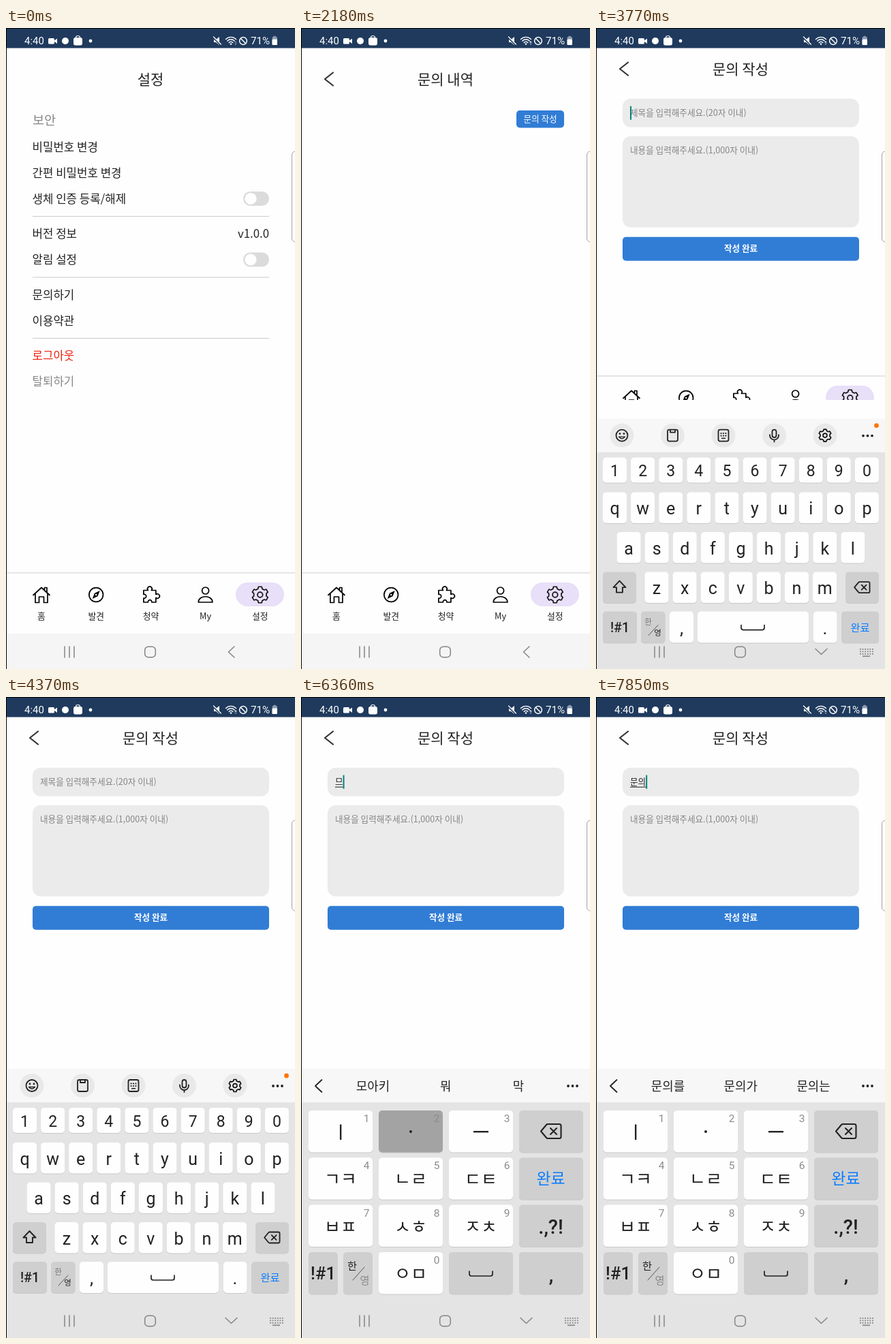
An HTML page with a canvas that plays this animation: 424x941 px, repeating every 8 s.

```html
<!DOCTYPE html>
<html lang="ko">
<head>
<meta charset="utf-8">
<title>문의 작성</title>
<style>
html, body { margin: 0; width: 100%; height: 100%; overflow: hidden; background: #fefefe; }
canvas { display: block; width: 424px; height: 941px; }
</style>
</head>
<body>
<canvas id="stage"></canvas>
<script>
const W = 424, H = 941, LOOP = 8000;
const KR = '"Noto Sans CJK KR", "Noto Sans CJK", sans-serif';
const RB = 'Roboto, sans-serif';
const INK = '#222', PAGE = '#fefefe', BLUE = '#317dd5', HINT = '#858585';

const canvas = document.getElementById('stage');
const c = canvas.getContext('2d');
const dpr = window.devicePixelRatio || 1;
canvas.width = W * dpr;
canvas.height = H * dpr;

const clamp = v => Math.min(1, Math.max(0, v));
const smooth = v => v * v * (3 - 2 * v);

// y is the visual middle of the line
function txt(s, x, y, size, color = INK, align = 'center', weight = 400, font = KR) {
  c.font = `${weight} ${size}px ${font}`;
  c.textAlign = align;
  c.fillStyle = color;
  c.fillText(s, x, y + size * (font === KR ? 0.37 : 0.355));
}
function box(x, y, w, h, color) {
  c.fillStyle = color;
  c.fillRect(x, y, w, h);
}
function round(x, y, w, h, r, color) {
  c.beginPath();
  c.roundRect(x, y, w, h, r);
  c.fillStyle = color;
  c.fill();
}
function dot(x, y, r, color) {
  c.beginPath();
  c.arc(x, y, r, 0, Math.PI * 2);
  c.fillStyle = color;
  c.fill();
}
function ring(x, y, r, color, w) {
  c.beginPath();
  c.arc(x, y, r, 0, Math.PI * 2);
  c.strokeStyle = color;
  c.lineWidth = w;
  c.stroke();
}
function stroke(d, color, w) {
  c.strokeStyle = color;
  c.lineWidth = w;
  c.stroke(new Path2D(d));
}
function fill(d, color) {
  c.fillStyle = color;
  c.fill(new Path2D(d));
}
function at(x, y, draw) {
  c.save();
  c.translate(x, y);
  draw();
  c.restore();
}

function gear(r, w) {
  c.beginPath();
  for (let i = 0; i < 6; i++) {
    const a = i * Math.PI / 3 - Math.PI / 2;
    for (const [da, k] of [[-0.33, 0.78], [-0.2, 1], [0.2, 1], [0.33, 0.78]])
      c.lineTo(Math.cos(a + da) * r * k, Math.sin(a + da) * r * k);
  }
  c.closePath();
  c.strokeStyle = '#111';
  c.lineWidth = w;
  c.stroke();
  ring(0, 0, r * 0.32, '#111', w);
}

// ---- system chrome ----
function statusBar(t) {
  box(0, 0, W, 29.5, '#1f3a5d');
  txt('4:40', 27, 19, 15, '#fff', 'left', 400, RB);
  round(62, 15, 9, 8.5, 1.5, '#fff');
  fill('M70 19l5-3.5v7.5z', '#fff');
  dot(87, 19, 5, '#fff');
  round(99, 14, 13, 11.5, 3, '#fff');
  stroke('M102.5 15v-1a3 2.5 0 0 1 6 0v1', '#fff', 1.2);
  dot(124, 19, 2.4, '#fff');
  fill('M305 17h3l5-4v12l-5-4h-3z', '#fff');
  stroke('M304 13.5l11 11', '#1f3a5d', 3);
  stroke('M304.5 13l11 11', '#fff', 1.3);
  stroke('M322.5 16.5a10.5 10.5 0 0 1 15 0M324.8 19a7.3 7.3 0 0 1 10.4 0M327.2 21.4a4 4 0 0 1 5.6 0', '#fff', 1.4);
  dot(330, 23.5, 1.3, '#fff');
  fill('M335.2 21.5h3.6l-1.8-2.5z', t < 480 ? '#8192a8' : '#fff');
  fill('M335.2 22.8h3.6l-1.8 2.5z', '#8192a8');
  ring(348, 19, 5.4, '#fff', 1.5);
  stroke('M344.3 15.3l7.4 7.4', '#fff', 1.5);
  txt('71%', 359, 19, 15.2, '#fff', 'left', 400, RB);
  round(390.5, 13, 7.5, 12, 1.5, '#8d9bb0');
  round(392.5, 11.8, 3.5, 2, 0.5, '#8d9bb0');
  round(390.5, 16.5, 7.5, 8.5, 1.5, '#fff');
}

function systemNav(keys) {
  const grey = '#858585';
  stroke('M86 908v16M93 908v16M100 908v16', grey, 1.5);
  c.beginPath();
  c.roundRect(203.7, 908.2, 15.6, 15.6, 5);
  c.lineWidth = 1.5;
  c.stroke();
  if (!keys) return stroke('M335 908l-8.500 8 8.500 8', grey, 1.5);
  stroke('M322 911.500l8.500 8 8.500-8', grey, 1.5);
  for (let r = 0; r < 3; r++)
    for (let i = 0; i < 6; i++) box(387 + i * 3.6, 911 + r * 3.5, 1.8, 1.8, grey);
  box(391, 921.5, 11, 1.6, grey);
}

function edgeHandle() {
  c.beginPath();
  c.roundRect(419.5, 181, 14, 133, 5);
  c.fillStyle = PAGE;
  c.fill();
  c.strokeStyle = '#a3a3a3';
  c.lineWidth = 1;
  c.stroke();
}

// ---- app ----
const tabs = [
  ['홈', () => stroke('M-12 0.500L0-10.500 12 0.500M-9-2v13.500h5.500v-8.500h7v8.500H9V-2M4.500-7v-3.500H8V-3.500', '#000', 1.7)],
  ['발견', () => {
    ring(0, 0, 10.3, '#000', 1.7);
    fill('M5.500-6L2.300 2.200-5.500 6-2.300-2.200z', '#000');
    dot(0, 0, 1.2, '#fff');
  }],
  ['청약', () => stroke('M-10.500-6.500h6.500a3.300 3.300 0 1 1 5 0h6.500v6a3.300 3.300 0 1 1 0 5v6.500h-6a2.800 2.800 0 1 0-5.500 0h-6.500v-6a2.900 2.900 0 1 0 0-5.500z', '#000', 1.7)],
  ['My', () => {
    ring(0, -6, 5, '#000', 1.7);
    stroke('M-10.300 11c0-11 20.600-11 20.600 0z', '#000', 1.7);
  }],
  ['설정', () => gear(12, 1.7)]
];

function tabBar() {
  box(1, 799, W, 90, PAGE);
  box(1, 799, W, 1.7, '#e1e1e3');
  round(337, 814, 71, 35, 17.5, '#e8dff8');
  tabs.forEach(([name, icon], i) => {
    const x = 52 + i * 80.2;
    at(x, 832, icon);
    txt(name, x, 863, 12.8, '#222', 'center', 500);
  });
}

function toggle(y) {
  round(348, y, 38, 21, 10.5, '#dbdbdb');
  dot(359, y + 10.5, 8.6, '#fff');
}

function settingsPage() {
  txt('설정', 212, 75, 21);
  txt('보안', 39, 135, 18.6, '#888', 'left');
  const rows = [['비밀번호 변경', 175], ['간편 비밀번호 변경', 213], ['생체 인증 등록/해제', 251],
    ['버전 정보', 302], ['알림 설정', 340], ['문의하기', 392], ['이용약관', 430],
    ['로그아웃', 481, '#ee2211'], ['탈퇴하기', 519, '#888']];
  for (const [s, y, color] of rows) txt(s, 38.5, y, 16.8, color, 'left', color === '#888' ? 400 : 500);
  txt('v1.0.0', 386, 302, 16.8, INK, 'right', 500);
  for (const y of [276, 365.5, 455]) box(39, y, 347, 1, '#cbcbcb');
  toggle(240);
  toggle(329.5);
}

function header(title, y) {
  stroke(`M47 ${y - 9.5}l-12 9.500 12 9.500`, '#333', 2.2);
  txt(title, 212, y, 21);
}

function listPage() {
  header('문의 내역', 75);
  round(316, 121, 70, 25.5, 5, BLUE);
  txt('문의 작성', 351, 133.3, 12.6, '#fff', 'center', 500);
}

function formPage(t, raised, typed) {
  header('문의 작성', raised ? 60 : 75);
  at(0, raised ? -30.3 : 0, () => {
    round(39, 134, 347, 42, 12, '#ebebeb');
    round(39, 189, 347, 134, 12, '#ebebeb');
    round(39, 337, 347, 35, 5, BLUE);
    txt('내용을 입력해주세요.(1,000자 이내)', 50, 210, 12.6, HINT, 'left');
    txt('작성 완료', 212.5, 353.5, 12.6, '#fff', 'center', 700);
    let w = 0;
    if (typed) {
      txt(typed, 50, 155, 12.6, INK, 'left');
      w = c.measureText(typed).width;
      box(50, 162, w, 1, INK);
    } else {
      txt('제목을 입력해주세요.(20자 이내)', 50, 155, 12.6, HINT, 'left');
    }
    const lit = t >= 3550 && (t >= 5570 || Math.floor((t - 3570) / 500) % 2 <= 0);
    if (lit) box(50 + w, 145, 2, 20, '#00857a');
  });
}

// ---- keyboard ----
const entries = [
  [5870, 'ㅇ', '아 오늘 이'], [6070, 'ㅁ', '모아키 뭐 막'], [6260, '므', '모아키 뭐 막'],
  [6460, '무', '모아키 뭐 막'], [6560, '무', '무슨 무료 무조건'], [6760, '문', '문제 문자 문의'],
  [6960, '문ㅇ', '문제 문자 문의'], [7160, '문으', '문을 문은 문의'],
  [7350, '문의', '문을 문은 문의'], [7550, '문의', '문의를 문의가 문의는']
];
// [from, to, key]
const presses = [[5770, 5870, 13], [5970, 6070, 13], [6160, 6260, 2], [6360, 6460, 1],
  [6660, 6760, 5], [6860, 6960, 13], [7060, 7160, 2], [7260, 7350, 0]];

function key(x, y, w, h, color = '#fefefe') {
  round(x, y + 1, w, h, 5, '#c9c9c9');
  round(x, y, w, h, 5, color);
}
const FN = '#cfcfcf', DOWN = '#a3a3a3';

function backspace(x, y, k) {
  at(x, y, () => {
    c.scale(k, k);
    stroke('M-15 0l8-9.500q.8-1 2-1H12q2.500 0 2.500 2.500V8q0 2.500-2.500 2.500H-5q-1.200 0-2-1zM-1-4.500l9 9M8-4.500l-9 9', INK, 2.1 / Math.sqrt(k));
  });
}
function spaceMark(x, y, w) {
  stroke(`M${x - w} ${y - 4}v4q0 3 3 3h${2 * w - 6}q3 0 3-3v-4`, INK, 1.7);
}

const tools = [
  () => {
    ring(0, 0, 8.5, INK, 1.8);
    dot(-3, -2.5, 1.4, INK);
    dot(3, -2.5, 1.4, INK);
    stroke('M-4.500 2q4.500 5.500 9 0z', INK, 1.4);
  },
  () => stroke('M-5-8.500H5q2.500 0 2.500 2.500V6q0 2.500-2.500 2.500H-5q-2.500 0-2.500-2.500V-6q0-2.500 2.500-2.500zM-3.500-8v3.500h7V-8', INK, 1.8),
  () => {
    stroke('M-5-8.500H5q2.500 0 2.500 2.500V6q0 2.500-2.500 2.500H-5q-2.500 0-2.500-2.500V-6q0-2.500 2.500-2.500z', INK, 1.8);
    for (let i = 0; i < 6; i++) dot(i % 3 * 3.4 - 3.4, i < 3 ? -3 : 0.5, 1.1, INK);
    box(-3, 3.5, 6, 1.5, INK);
  },
  () => {
    stroke('M-3-5.500a3 3 0 0 1 6 0V0a3 3 0 0 1-6 0zM-6.500-1v1a6.500 6.500 0 0 0 13 0v-1M0 6.500V9.500', INK, 1.8);
  },
  () => gear(9.2, 1.7)
];

function toolbar(hints, badge) {
  box(1, 546, W, 49, '#f7f7f7');
  if (hints) {
    stroke('M30.500 562l-9.500 9 9.500 9', INK, 1.8);
    hints.split(' ').forEach((s, i) => txt(s, 105.5 + i * 106.8, 571, 17.9));
  } else {
    tools.forEach((icon, i) => {
      const x = 38 + i * 74.5;
      dot(x, 570.5, 17.5, '#e9e9e9');
      at(x, 570.5, icon);
    });
  }
  for (let i = 0; i < 3; i++) dot(392 + i * 6.5, 571, 1.9, INK);
  if (badge) dot(411.5, 556, 3.4, '#ff7300');
}

function latinKeys(t) {
  const rows = [['1234567890', 10, 603, 37], ['qwertyuiop', 10, 654, 45.5],
    ['asdfghjkl', 30.6, 712.5, 45.5], ['zxcvbnm', 71.5, 771, 45.5]];
  rows.forEach(([chars, x0, y, h], r) => [...chars].forEach((s, i) => {
    const x = x0 + i * 41.1;
    key(x, y, 35, h);
    txt(s, x + 17.5, y + h / 2 + 1, r ? 25 : 23, INK, 'center', 400, RB);
  }));
  key(10, 771, 49, 45.5, FN);
  stroke('M34.500 784l-9 9.500h4.500v7.500h9v-7.500h4.500z', INK, 1.9);
  key(366, 771, 49, 45.5, FN);
  backspace(390.5, 793.5, 0.76);
  key(10, 829, 50, 46, FN);
  txt('!#1', 35, 852.5, 19.5, INK, 'center', 500, RB);
  key(66, 829, 35.5, 46, t >= 4970 ? DOWN : FN);
  txt('한', 76.5, 844, 11.5, '#777');
  stroke('M77 864l14-15', '#555', 1);
  txt('영', 90.5, 860, 11.5);
  key(108, 829, 35, 46);
  txt(',', 125.5, 853, 26, INK, 'center', 400, RB);
  key(149, 829, 163, 46);
  spaceMark(230, 853, 17);
  key(319, 829, 34.5, 46);
  txt('.', 336, 853, 26, INK, 'center', 400, RB);
  key(360, 829, 55, 46, FN);
  txt('완료', 387.5, 852.5, 15.3, '#0a7cff', 'center', 500);
}

const jamo = ['', '', '', '', 'ㄱㅋ', 'ㄴㄹ', 'ㄷㅌ', '', 'ㅂㅍ', 'ㅅㅎ', 'ㅈㅊ', '', '', 'ㅇㅁ'];

function hangulKeys(t) {
  const hit = presses.find(p => t >= p[0] && t < p[1]);
  for (let i = 0; i < 16; i++) {
    const col = i % 4, row = i >> 2;
    const x = 11 + col * 103, y = 607 + row * 69.3;
    if (i === 12) continue;
    const plain = col < 3 && i !== 14;
    key(x, y, 94, 61.5, hit && hit[2] === i ? DOWN : plain ? '#fefefe' : FN);
    if (!plain) continue;
    txt(i === 13 ? '0' : String(row * 3 + col + 1), x + 85, y + 11.5, 15.5, '#8c8c8c', 'center', 400, RB);
    if (jamo[i]) txt(jamo[i], x + 47, y + 31.5, 26, INK, 'center', 500);
  }
  box(57, 627.5, 2.4, 22.5, INK);
  dot(161, 638, 2, INK);
  box(253, 637, 22, 2.4, INK);
  backspace(367, 637.5, 1);
  txt('완료', 366.5, 707, 22.8, '#0a7cff', 'center', 500);
  txt('.,?!', 366.5, 778, 29, INK, 'center', 500, RB);
  txt(',', 367, 848, 29, INK, 'center', 500, RB);
  spaceMark(264, 847, 17);
  key(11, 815, 43, 61.5, FN);
  txt('!#1', 32.5, 846, 25.5, INK, 'center', 500, RB);
  key(62, 815, 43, 61.5, FN);
  txt('한', 75, 835, 15.3, INK, 'center', 500);
  stroke('M76 856l17-19', '#555', 1);
  txt('영', 93.5, 856, 15.3, '#888');
}

function keyboard(t, dy, hints) {
  const hangul = t >= 5070;
  at(0, dy, () => {
    box(1, 595, W, H, '#e4e4e4');
    toolbar(hints, !hangul);
    (hangul ? hangulKeys : latinKeys)(t);
  });
}

function fade(a, draw) {
  if (a <= 0) return;
  c.save();
  c.globalAlpha = a;
  draw();
  c.restore();
}

function render(t) {
  c.setTransform(dpr, 0, 0, dpr, 0, 0);
  c.lineJoin = c.lineCap = 'round';
  box(0, 0, W, H, PAGE);

  const toList = smooth(clamp((t - 1740) / 430));
  const toForm = smooth(clamp((t - 2540) / 510));
  const raised = t >= 3670;
  const entry = entries.filter(e => t >= e[0]).pop() || [];

  fade(1 - toList, settingsPage);
  fade(toList * (1 - toForm), listPage);
  fade(toForm, () => formPage(t, raised, entry[1]));

  if (!raised) tabBar();
  else if (t < 3870) {
    c.save();
    c.beginPath();
    c.rect(0, 0, W, 546);
    c.clip();
    at(0, -289, tabBar);
    c.restore();
  }
  box(1, 889, W, 52, '#f5f5f5');
  if (t > 3580) keyboard(t, 395 * Math.pow(1 - clamp((t - 3570) / 300), 2.4), entry[2]);
  systemNav(raised);
  statusBar(t);
  edgeHandle();
  box(0, 0, 1, H, '#000');
  box(0, 0, W, 1, '#000');
}

const start = performance.now();
function tick() {
  render((performance.now() - start) % LOOP);
  requestAnimationFrame(tick);
}
tick();
</script>
</body>
</html>
```
